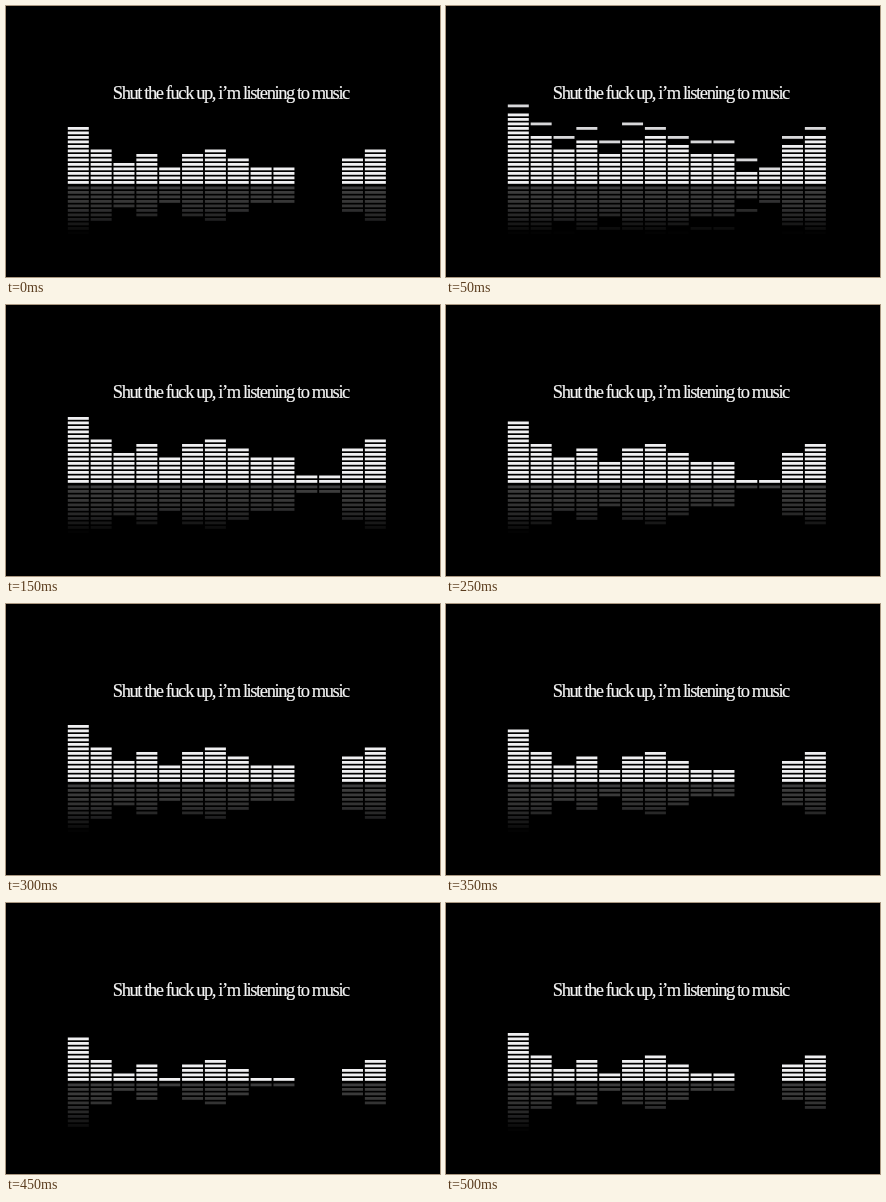
Animation of 434x271 px, one loop 550 ms. Source, as an HTML page with a canvas:

```html
<!DOCTYPE html>
<html lang="en">
<head>
<meta charset="utf-8">
<title>Equalizer</title>
<style>
  html, body { margin: 0; width: 100%; height: 100%; overflow: hidden; background: #000; }
  canvas, svg { position: absolute; left: 0; top: 0; width: 434px; height: 271px; }
  text {
    font: 18.5px "Liberation Serif", serif;
    letter-spacing: -1.42px;
    fill: #f4f4f4;
    stroke: #f4f4f4;
    stroke-width: 0.2px;
  }
</style>
</head>
<body>
<canvas id="stage" width="434" height="271"></canvas>
<svg viewBox="0 0 434 271"><text x="106.8" y="92.7">Shut the fuck up, i’m listening to music</text></svg>
<script>
const ctx = document.getElementById('stage').getContext('2d');

const STEP = 50;
const PITCH = 4.5;
const ROW = 2.8;
const BAR_WIDTH = 21;
const BAR_PITCH = 22.85;
const LEFT = 61.8;
const FLOOR = 179.5;
const MIRROR = 180.5;
const FADE = 46;

// Resting level of each bar and the level its cap is thrown to on the beat.
const levels = [13, 8, 5, 7, 4, 7, 8, 6, 4, 4, 0, 0, 6, 8];
const caps = [18, 14, 11, 13, 10, 14, 13, 11, 10, 10, 6, 4, 11, 13];

// Offset of every bar per step: a jump, a slow fall, a small recovery.
const offsets = [0, 3, 3, 2, 2, 1, 0, -1, -2, -3, -2];
const capAlpha = [0, 0.9, 0.4];

function drawRow(bar, row, alpha) {
  const x = LEFT + bar * BAR_PITCH;
  ctx.fillStyle = `rgba(240, 240, 242, ${alpha})`;
  ctx.fillRect(x, FLOOR - row * PITCH, BAR_WIDTH, ROW);

  const depth = (row - 1) * PITCH;
  const fade = 0.25 * Math.max(0, 1 - (depth / FADE) ** 2);
  ctx.fillStyle = `rgba(240, 240, 242, ${alpha * fade})`;
  ctx.fillRect(x, MIRROR + depth, BAR_WIDTH, ROW);
}

function draw(now) {
  const step = Math.floor(now / STEP) % offsets.length;
  ctx.fillStyle = '#000';
  ctx.fillRect(0, 0, 434, 271);
  levels.forEach((level, bar) => {
    const height = level + offsets[step];
    for (let row = 1; row <= height; row++) drawRow(bar, row, 1);
    if (capAlpha[step]) drawRow(bar, caps[bar], capAlpha[step]);
  });
}

let start;
function tick(now) {
  start ??= now;
  draw(now - start);
  requestAnimationFrame(tick);
}
draw(0);
requestAnimationFrame(tick);
</script>
</body>
</html>
```
